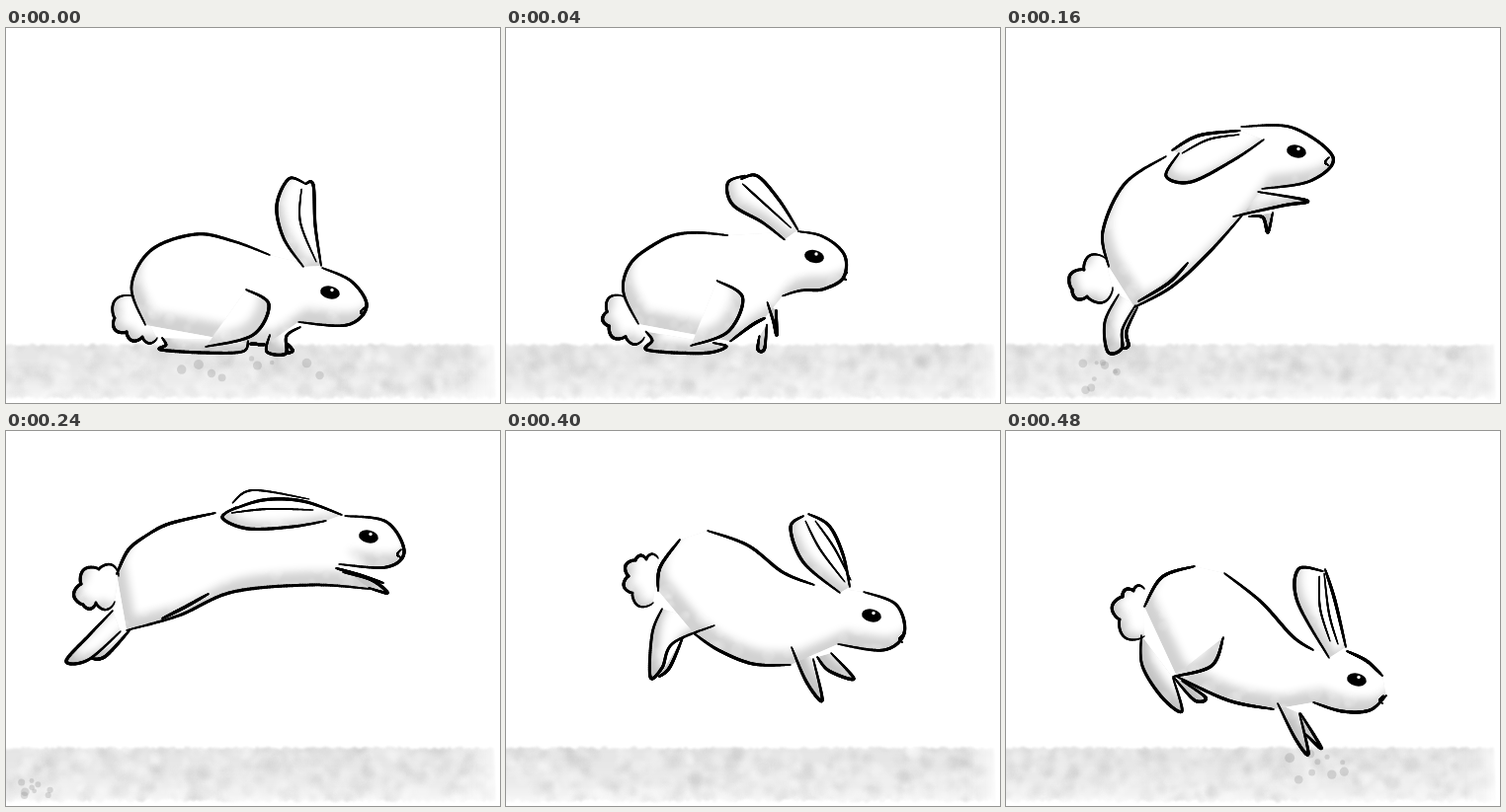
Recreate the animation shown at these times as an HTML page with a canvas. Size 500x380 px, loop 0.56 s.

```html
<!DOCTYPE html>
<html lang="en">
<head>
<meta charset="utf-8">
<title>Hopping rabbit</title>
<style>
  html, body { margin: 0; width: 100%; height: 100%; overflow: hidden; background: #fff; }
  #strip { display: block; will-change: transform; }
</style>
</head>
<body>
<canvas id="strip"></canvas>
<script>
const W = 500, H = 380, LOOP = 560, SAMPLES = 120;
const OUTLINE = ['rump', 'back', 'brow', 'head', 'belly'];
const LIMBS = ['leg', 'foot', 'paw', 'arm'];
const FINE = ['earMid', 'crease'];

// Every part is one brush line through a few points; face holds the eye and the nose.
const land = pose({
  face: '328,268 363,283',
  back: '141,301 127,262 147,225 192,209 230,216 267,230',
  head: '320,243 350,257 365,282 345,301 296,298',
  earA: '302,157 286,153 274,180 281,213 301,242',
  earB: '303,158 311,159 313,200 319,241',
  earMid: '299,163 298,197 314,237',
  haunch: '243,265 266,280 250,311 202,323',
  leg: '158,314 162,321 157,326 200,329 239,328 245,317',
  arm: '267,311 264,328 283,330 284,312 298,303',
  paw: '283,330 290,327 284,319',
  belly: '263,321 246,320',
  tail: '129,272 110,294 122,308 138,313 153,314',
  spots: '250,346 75,12'
});

const rise = pose({
  face: '296,195 328,212',
  back: '127,299 108,266 112,237 138,203 182,190',
  head: '271,169 300,171 327,194 318,224 290,232 273,230 264,245',
  earA: '182,142 163,161 185,178 238,181 263,187',
  earB: '173,148 198,141 240,149 272,168',
  earMid: '180,153 215,150 263,168',
  crease: '196,185 243,182',
  haunch: '184,247 213,266 200,304 172,321',
  leg: '125,301 134,312 131,327 200,330 207,318 174,321',
  arm: '262,245 277,266 265,292 263,270 249,269',
  paw: '230,294 222,324 235,324 244,282',
  belly: '261,267 246,280 208,315',
  tail: '108,272 95,281 87,296 104,312 127,313'
});

const launch = pose({
  face: '294,125 327,131',
  back: '104,242 98,206 120,158 162,130',
  head: '238,100 290,101 331,131 308,155 259,163',
  earA: '175,127 162,150 187,156 230,134 261,113',
  earB: '168,124 195,109 237,104',
  earMid: '178,127 205,113 236,108',
  haunch: '184,238 165,258 134,277',
  leg: '114,270 100,298 103,328 117,325 118,305 131,281',
  foot: '117,325 124,322 122,307 133,283',
  arm: '255,166 305,175 280,180 230,191',
  paw: '246,191 260,192 265,207 270,187',
  belly: '239,190 205,228 168,262 130,283',
  tail: '100,233 79,245 67,265 82,272 108,263',
  spots: '95,353 18,14'
});

const stretch = pose({
  face: '367,107 400,120',
  rump: '112,145 125,119 150,101',
  back: '140,107 165,94 212,83',
  head: '343,86 385,92 403,122 385,138 337,135',
  earA: '233,77 219,88 245,99 290,97 324,91',
  earB: '223,82 260,70 300,71 340,85',
  earMid: '228,83 265,79 311,80',
  crease: '229,73 250,60 307,69',
  haunch: '205,165 180,179 158,190',
  leg: '108,182 85,206 61,233 83,232 116,203',
  foot: '87,231 101,228 126,201',
  arm: '334,139 358,146 382,154',
  paw: '341,143 370,151 386,164 367,159',
  belly: '368,160 310,156 230,163 175,187 122,202',
  tail: '114,147 94,140 76,155 78,176 91,174 110,173',
  spots: '30,362 15,8'
});

const descend = pose({
  face: '370,187 402,206',
  rump: '154,162 156,138 176,110',
  back: '204,101 245,116 280,143 312,156',
  head: '362,163 395,176 403,205 382,222 336,216',
  earA: '301,86 288,98 301,133 338,164',
  earB: '306,84 327,96 341,125 348,158',
  earMid: '303,91 318,120 343,153',
  crease: '313,91 332,118 349,151',
  leg: '158,180 148,205 146,249 158,240 169,215 211,197',
  foot: '155,249 166,239 179,209',
  arm: '289,219 304,254 320,273 311,231',
  paw: '315,229 327,243 352,251 329,225',
  belly: '288,237 250,236 215,222 190,205',
  tail: '154,129 142,130 131,131 124,147 128,164 149,174'
});

const touch = pose({
  face: '355,252 382,268',
  rump: '140,178 158,148 191,137',
  back: '221,144 258,173 290,208 311,222',
  brow: '345,223 365,233 381,248',
  head: '385,268 368,283 340,284 311,275',
  earA: '321,142 296,140 295,173 327,230',
  earB: '323,140 333,172 344,219',
  earMid: '317,147 318,180 328,213',
  crease: '322,144 327,185 336,216',
  haunch: '220,209 208,238 169,249',
  leg: '137,207 138,238 158,270 178,284 169,250',
  foot: '170,250 191,273 202,270 178,253',
  arm: '275,276 293,312 306,327 297,286',
  paw: '298,286 319,321 303,307',
  belly: '271,282 225,273 173,249',
  tail: '140,160 129,162 118,168 115,191 140,208',
  spots: '312,340 38,14'
});

const timeline = [
  [0, land], [40, mix(land, rise)], [80, rise], [160, launch],
  [240, stretch], [320, mix(stretch, descend)], [400, descend], [480, touch]
];

function pose(parts) {
  const shape = {};
  for (const [name, text] of Object.entries(parts)) {
    const points = text.split(' ').map(pair => pair.split(',').map(Number));
    const plain = name === 'face' || name === 'spots';
    shape[name] = plain ? points : name === 'tail' ? scallop(points) : curve(points);
  }
  return shape;
}

function sample(points, place) {
  const last = points.length - 1;
  return Array.from({ length: SAMPLES + 1 }, (_, k) => {
    const s = k / SAMPLES * last, i = Math.min(Math.floor(s), last - 1);
    return place(i, s - i);
  });
}

// Catmull-Rom spline
function curve(points) {
  const at = i => points[Math.max(0, Math.min(points.length - 1, i))];
  return sample(points, (i, t) => {
    const [a, b, c, d] = [at(i - 1), at(i), at(i + 1), at(i + 2)];
    return [0, 1].map(n => b[n] + t / 2 * (c[n] - a[n]
      + t * (2 * a[n] - 5 * b[n] + 4 * c[n] - d[n] + t * (3 * (b[n] - c[n]) + d[n] - a[n]))));
  });
}

// Row of fluffy bumps between the points
function scallop(points) {
  return sample(points, (i, t) => {
    const [[x, y], [u, v]] = [points[i], points[i + 1]];
    const bulge = .4 * Math.sin(Math.PI * t) ** .7;
    return [x + (u - x) * t - (v - y) * bulge, y + (v - y) * t + (u - x) * bulge];
  });
}

function mix(a, b) {
  if (typeof a === 'number') return (a + b) / 2;
  if (Array.isArray(a)) return a.slice(0, b.length).map((v, i) => mix(v, b[i]));
  const shared = Object.keys(a).filter(key => key in b);
  return Object.fromEntries(shared.map(key => [key, mix(a[key], b[key])]));
}

function random(seed) {
  return () => {
    seed = (seed * 1664525 + 1013904223) >>> 0;
    return seed / 2 ** 32;
  };
}

function trace(ctx, path) {
  ctx.beginPath();
  path.forEach(([x, y]) => ctx.lineTo(x, y));
}

function disc(ctx, x, y, r) {
  ctx.beginPath();
  ctx.arc(x, y, r, 0, 7);
  ctx.fill();
}

function brush(ctx, path, width) {
  for (let i = 1; i < path.length; i++) {
    ctx.lineWidth = width * (.4 + .6 * Math.sin(Math.PI * i / path.length) ** .6);
    trace(ctx, [path[i - 1], path[i]]);
    ctx.stroke();
  }
}

// Grey wash that stays along the edges facing away from (dx, dy)
function wash(ctx, path, grey, dx, dy) {
  ctx.save();
  trace(ctx, path);
  ctx.clip();
  ctx.fillStyle = `rgb(${grey},${grey},${grey})`;
  ctx.fill();
  ctx.filter = 'blur(4px)';
  ctx.translate(dx, dy);
  ctx.fillStyle = '#fff';
  trace(ctx, path);
  ctx.fill();
  ctx.restore();
}

function newLayer() {
  const canvas = document.createElement('canvas');
  canvas.width = W;
  canvas.height = H;
  const ctx = canvas.getContext('2d');
  ctx.lineCap = ctx.lineJoin = 'round';
  return ctx;
}

function drawGround(ctx, spots, rnd) {
  const tone = ctx.createLinearGradient(0, 319, 0, 377);
  ['#e5e5e5', '#e7e7e7', '#ececec', '#f8f8f8'].forEach((c, i) => tone.addColorStop(i / 3, c));
  ctx.filter = 'blur(0.8px)';
  ctx.fillStyle = tone;
  ctx.beginPath();
  for (let x = -4; x <= 496; x += 3) ctx.lineTo(x, 319.5 + rnd() * 3);
  for (let x = 496; x >= -4; x -= 3) ctx.lineTo(x, 373 + rnd() * 4);
  ctx.fill();
  ctx.filter = 'blur(2px)';
  ctx.globalCompositeOperation = 'source-atop';
  for (let i = 0; i < 420; i++) {
    ctx.fillStyle = i % 2 ? 'rgba(255,255,255,.22)' : 'rgba(160,160,160,.09)';
    disc(ctx, rnd() * W, 318 + rnd() * 60, 2 + rnd() * 6);
  }
  const edge = ctx.createLinearGradient(465, 0, 498, 0);
  edge.addColorStop(0, 'rgba(255,255,255,0)');
  edge.addColorStop(1, 'rgba(255,255,255,.75)');
  ctx.fillStyle = edge;
  ctx.fillRect(465, 310, 35, 70);
  ctx.globalCompositeOperation = 'source-over';
  if (!spots) return;
  const [[x, y], [dx, dy]] = spots;
  ctx.filter = 'blur(0.7px)';
  ctx.fillStyle = 'rgba(120,120,120,.24)';
  for (let i = 0; i < 9; i++) {
    disc(ctx, x + dx * (rnd() * 2 - 1), y + dy * (rnd() * 2 - 1), 2 + rnd() * 3);
  }
}

function drawRabbit(ctx, { face, spots, ...parts }, rnd) {
  const body = OUTLINE.flatMap(name => parts[name] || []);
  const ear = [...parts.earA, ...[...parts.earB].reverse()];
  wash(ctx, parts.tail, 205, 7, -5);
  for (const name of LIMBS) if (parts[name]) wash(ctx, parts[name], 196, 9, -9);
  wash(ctx, body, 210, 8, -14);
  if (parts.haunch) wash(ctx, parts.haunch, 214, -10, -10);
  wash(ctx, ear, 208, 6, -7);

  ctx.globalCompositeOperation = 'source-atop';
  ctx.filter = 'blur(1px)';
  ctx.fillStyle = 'rgba(255,255,255,.16)';
  for (let i = 0; i < 420; i++) disc(ctx, 50 + rnd() * 360, 55 + rnd() * 280, 2 + rnd() * 6);
  ctx.filter = 'none';
  ctx.globalCompositeOperation = 'source-over';

  ctx.strokeStyle = ctx.fillStyle = '#000';
  for (const [name, path] of Object.entries(parts)) brush(ctx, path, FINE.includes(name) ? 2 : 3.2);
  const [[x, y], [noseX, noseY]] = face;
  brush(ctx, curve([[noseX, noseY], [noseX - 4, noseY + 5], [noseX - 1, noseY + 8]]), 1.8);
  ctx.beginPath();
  ctx.ellipse(x, y, 10, 6.5, .2, 0, 7);
  ctx.fill();
  ctx.fillStyle = '#fff';
  disc(ctx, x + 2, y - 2.5, 1.7);
}

const strip = document.getElementById('strip');
strip.width = W;
strip.height = H * timeline.length;
const sheet = strip.getContext('2d');
sheet.fillStyle = '#fff';
sheet.fillRect(0, 0, strip.width, strip.height);

timeline.forEach(([, rabbit], i) => {
  const rnd = random(71 + i * 9176);
  const ground = newLayer(), figure = newLayer();
  drawGround(ground, rabbit.spots, rnd);
  drawRabbit(figure, rabbit, rnd);
  sheet.drawImage(ground.canvas, 0, i * H);
  sheet.drawImage(figure.canvas, 0, i * H);
});

const steps = timeline.map(([time], i) => ({
  offset: time / LOOP, transform: `translateY(${-i * H}px)`, easing: 'step-end'
}));
steps.push({ ...steps[steps.length - 1], offset: 1 });
strip.animate(steps, { duration: LOOP, iterations: Infinity });
</script>
</body>
</html>
```
